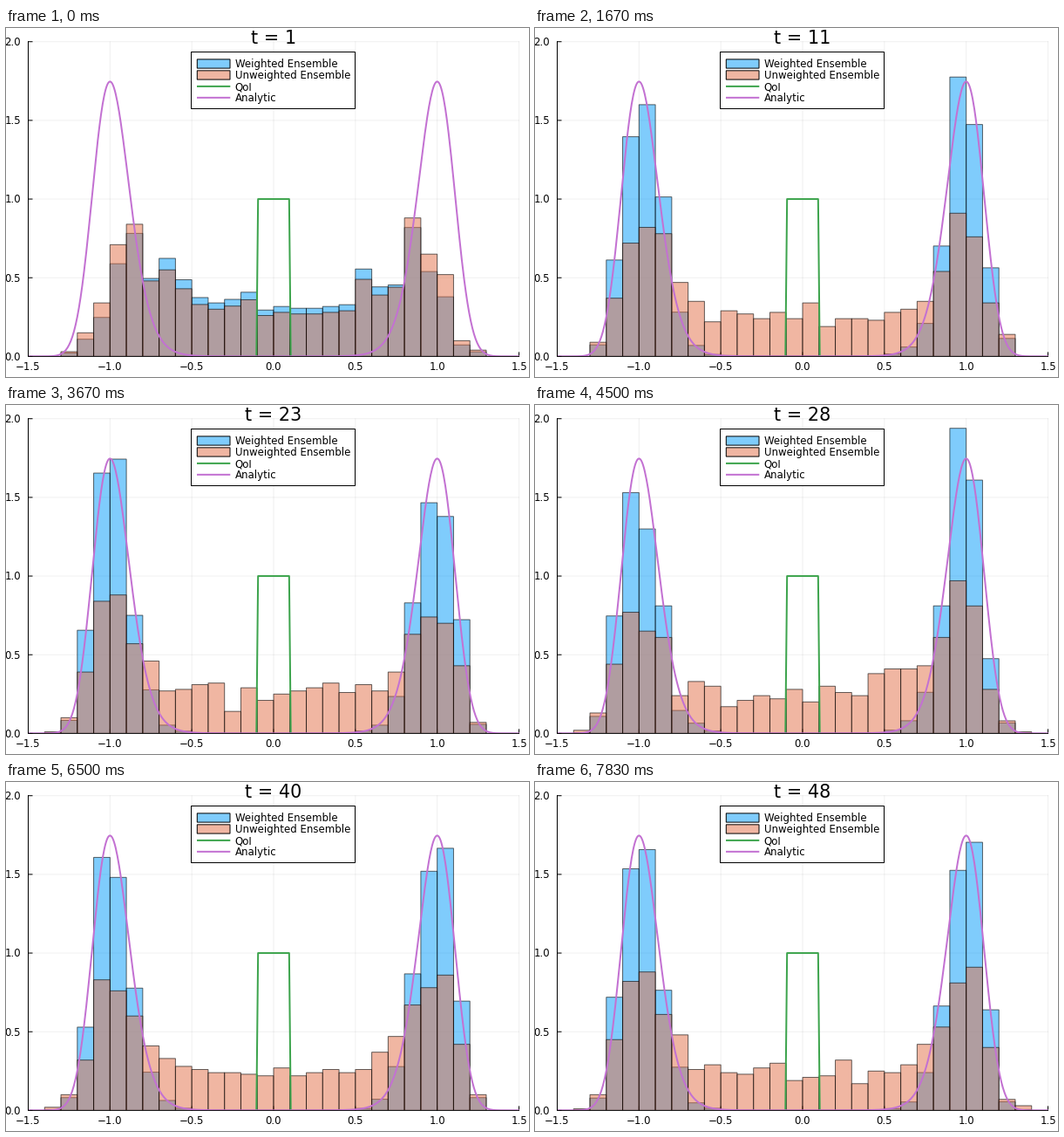
Animation of 600x400 px, one loop 8 s. Source, as a matplotlib script:

```python
import matplotlib.pyplot as plt
import numpy as np
from matplotlib.animation import FuncAnimation
from matplotlib.patches import Rectangle

W, H, DPI = 600, 400, 100
PX = 72 / DPI                      # one pixel in points
FRAMES, INTERVAL = 48, 166.5
X0, X1, Y0, Y1 = 25.5, 588.5, 376.4, 15.7
BLUE, ORANGE, GREEN, PURPLE = "#009AFA", "#E26F46", "#3DA44D", "#C371D2"
FONT, TITLE = 11.8 * PX, 20.8 * PX

EDGES = np.arange(-14, 14) / 10    # left edges of the bins
R = abs(EDGES + 0.05)              # distance of each bin from zero


def well(x, depth):
    """Double-well density with peaks of height 1 at x = -1 and 1."""
    return np.exp(-depth * (x**2 - 1)**2)


def scaled(values, total=10):
    return values * total / values.sum()


# Wide first ensemble, and the two-peaked one it settles into
START = scaled(np.interp(R, [0.45, 0.55, 0.75, 0.85, 0.95, 1.05, 1.15, 1.3],
                         [0.31, 0.44, 0.55, 0.73, 0.68, 0.40, 0.10, 0]))
START_RATIO = 1.12 - np.clip(R - 0.65, 0, 0.4)
PLATEAU = np.clip((1.17 - R) / 0.1, 0, 1)
SETTLED = scaled(0.24 * PLATEAU + 0.6 * well(R, 6))
SETTLED_RATIO = scaled(well(R, 10)) / SETTLED


def densities(step):
    """Weighted and unweighted histograms of 1000 samples."""
    rng = np.random.default_rng(step)
    early = np.exp(-(step - 1) / 2)
    mean = early * START + (1 - early) * SETTLED
    ratio = early * START_RATIO + (1 - early) * SETTLED_RATIO
    plain = rng.multinomial(1000, scaled(mean, 1)) / 100
    return scaled(plain * ratio), plain


fig = plt.figure(figsize=(W / DPI, H / DPI), dpi=DPI, facecolor="white")


def pixel_axes(zorder):
    axes = fig.add_axes([0, 0, 1, 1], zorder=zorder)
    axes.set(xlim=(0, W), ylim=(H, 0))
    axes.axis("off")
    return axes


back, stage = pixel_axes(-1), pixel_axes(1)
ax = fig.add_axes([X0 / W, 1 - Y0 / H, (X1 - X0) / W, (Y0 - Y1) / H])
ax.set(xlim=(-1.5, 1.5), ylim=(0, 2))
ax.axis("off")


def line(axes, xs, ys, color="black", width=1, **kw):
    axes.plot(xs, ys, color=color, lw=width * PX, snap=False, **kw)


def text(x, y, s, ha="center", size=FONT):
    return stage.text(x, y, s, ha=ha, va="baseline", fontsize=size,
                      family="DejaVu Sans", color="black")


def box(x, y, w, h, face, edge="black"):
    return Rectangle((x, y), w, h, facecolor=face, edgecolor=edge,
                     lw=PX, snap=False)


# Axes, grid and tick labels
for v in np.arange(-1.5, 1.6, 0.5):
    x = X0 + (v + 1.5) / 3 * (X1 - X0)
    line(back, [x, x], [Y1, Y0], alpha=0.06)
    line(back, [x, x], [Y0, Y0 - 4.5])
    text(x, 391.7, f"{v:.1f}".replace("-", "\u2212"))
for v in np.arange(0, 2.1, 0.5):
    y = Y0 + v / 2 * (Y1 - Y0)
    line(back, [X0, X1], [y, y], alpha=0.06)
    line(back, [X0, X0 + 4.5], [y, y])
    text(17, y + 4.3, f"{v:.1f}", "right")
line(back, [X0, X0, X1], [Y1, Y0, Y0])

# Histograms
bars = [[ax.add_patch(box(x, 0, 0.1, 0, (color, 0.5), ("black", 0.6)))
         for x in EDGES] for color in (BLUE, ORANGE)]

# Curves
line(ax, [-0.105, -0.095, 0.095, 0.105], [0, 1, 1, 0], GREEN, 2, zorder=3)
xs = np.linspace(-1.5, 1.5, 601)
pdf = scaled(well(xs, 10), 1 / (xs[1] - xs[0]))
line(ax, xs, pdf, PURPLE, 2, zorder=4)

# Legend
stage.add_patch(box(212.5, 27.5, 188, 65, "white"))
LABELS = ["Weighted Ensemble", "Unweighted Ensemble", "QoI", "Analytic"]
for i, (label, color) in enumerate(zip(LABELS, (BLUE, ORANGE, GREEN, PURPLE))):
    y = 41 + 12.95 * i
    text(262.7, y + 4.3, label, "left")
    if i < 2:
        stage.add_patch(box(219.3, y - 5.1, 37.7, 10.2, (color, 0.5)))
    else:
        line(stage, [219, 257.3], [y, y], color, 2, solid_capstyle="butt")

title = text(307, 18, "", size=TITLE)


def update(i):
    title.set_text(f"t = {i + 1}")
    for group, heights in zip(bars, densities(i + 1)):
        for bar, h in zip(group, heights):
            bar.set_height(h)
            bar.set_visible(h > 0)
    return []


anim = FuncAnimation(fig, update, frames=FRAMES, interval=INTERVAL,
                     init_func=lambda: update(0), repeat=True, repeat_delay=0)
plt.show()
```
